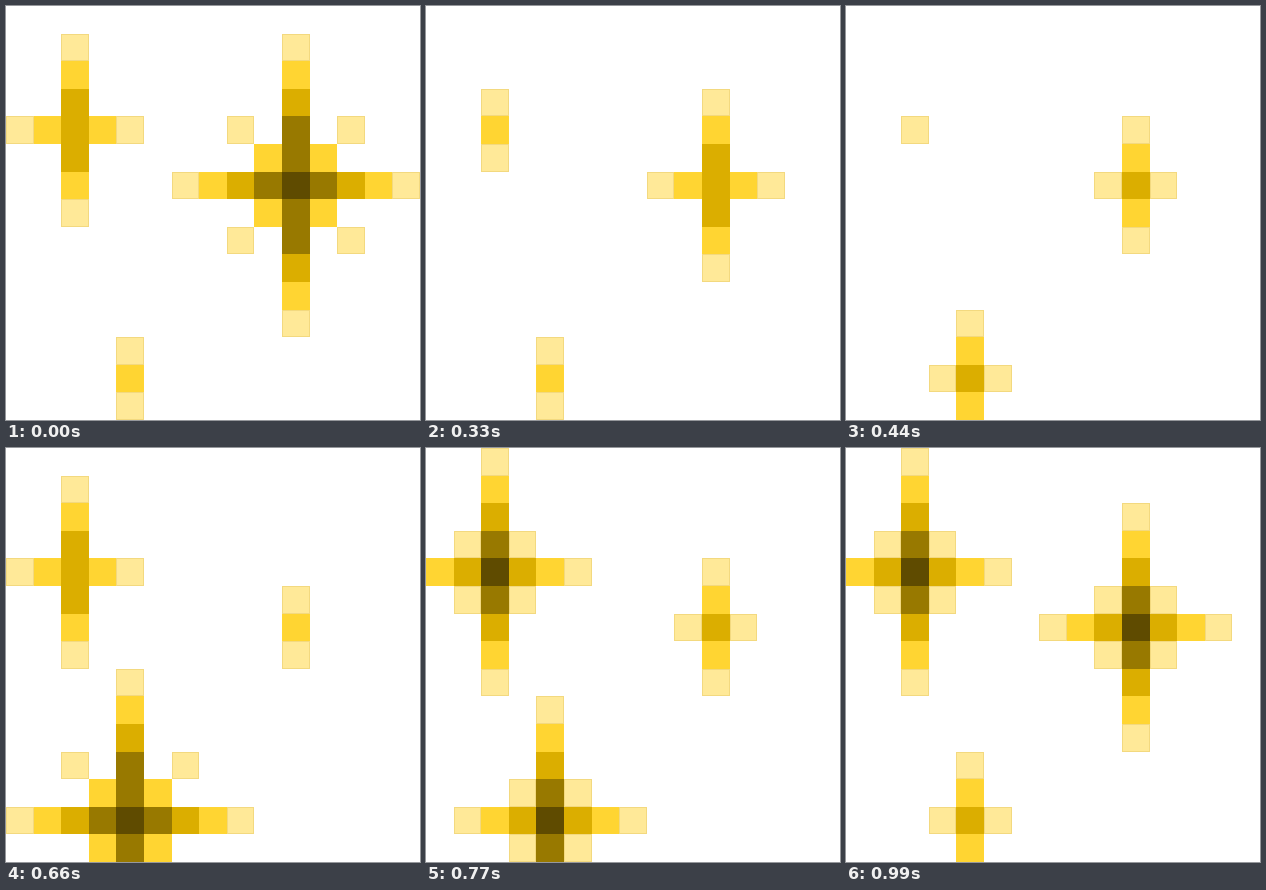
Animation, 414 px wide and 414 px high, one loop 1.1 s. Source, as an HTML page with a canvas:

```html
<!DOCTYPE html>
<html lang="en">
<head>
<meta charset="utf-8">
<title>Sparkles</title>
<style>
  html, body { margin: 0; width: 100%; height: 100%; overflow: hidden; background: #fff; }
  canvas { display: block; width: 414px; height: 414px; }
</style>
</head>
<body>
<canvas id="stage" width="414" height="414"></canvas>
<script>
const ctx = document.getElementById('stage').getContext('2d');
const CELL = 414 / 15, TICK = 110;
const COLORS = { L: '#ffe998', Y: '#ffd532', G: '#dbae00', B: '#987900', D: '#5f4b00' };

// Colours from the centre outwards, smallest sparkle first
const SIZES = [
  { v: 'L', h: 'L', d: '' },
  { v: 'YL', h: 'Y', d: '' },
  { v: 'GYL', h: 'GL', d: '' },
  { v: 'GGYL', h: 'GYL', d: '' },
  { v: 'DBGYL', h: 'DGYL', d: ' L' },
  { v: 'DBBGYL', h: 'DBGYL', d: ' YL' }
];
const STARS = [
  { col: 2, row: 4, phase: 2 },
  { col: 10, row: 6, phase: 0 },
  { col: 4, row: 13, phase: 4 }
];

function cell(col, row, key) {
  const x = Math.round(col * CELL), y = Math.round(row * CELL);
  const w = Math.round((col + 1) * CELL) - x, h = Math.round((row + 1) * CELL) - y;
  ctx.fillStyle = COLORS[key];
  ctx.fillRect(x, y, w, h);
  if (key === 'L') {
    ctx.strokeStyle = 'rgba(215, 180, 70, .3)';
    ctx.strokeRect(x + .5, y + .5, w - 1, h - 1);
  }
}

function arms(star, colors, directions) {
  [...colors].forEach((key, i) => {
    if (key === ' ') return;
    const spots = i ? directions : [[0, 0]];
    for (const [dx, dy] of spots) cell(star.col + dx * i, star.row + dy * i, key);
  });
}

function draw(now) {
  const tick = Math.floor(now / TICK) % 10;
  // The first pose is held for two ticks; one step is skipped halfway
  const step = tick < 5 ? Math.max(0, tick - 1) : tick;
  ctx.fillStyle = '#fff';
  ctx.fillRect(0, 0, 414, 414);
  for (const star of STARS) {
    const size = SIZES[Math.abs((step + star.phase) % 10 - 5)];
    arms(star, size.d, [[1, 1], [1, -1], [-1, 1], [-1, -1]]);
    arms(star, size.h, [[1, 0], [-1, 0]]);
    arms(star, size.v, [[0, 1], [0, -1]]);
  }
}

const start = performance.now();
function loop() {
  draw(performance.now() - start);
  requestAnimationFrame(loop);
}
loop();
</script>
</body>
</html>
```
